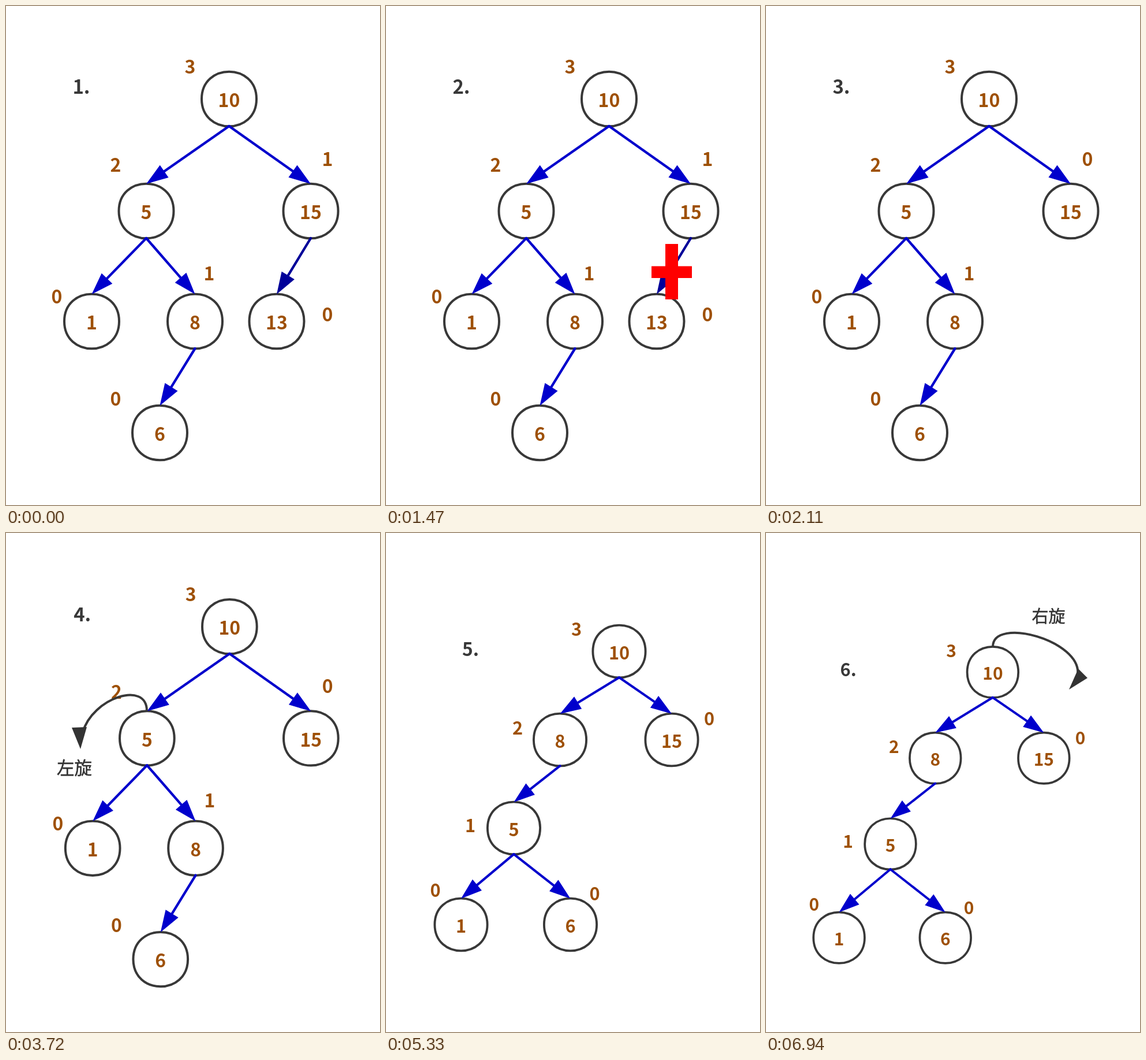
Animation, 648 px wide and 864 px high, one loop 8 s. Source, as an HTML page:

```html
<!DOCTYPE html>
<html lang="zh">
<head>
<meta charset="utf-8">
<title>Tree rotation</title>
<style>
  html, body { margin: 0; width: 100%; height: 100%; overflow: hidden; background: #fff; }
  svg { display: block; width: 648px; height: 864px; }
  text { font-family: "Noto Sans CJK SC", "Noto Sans CJK", "Open Sans", sans-serif; text-anchor: middle; }
  .num { font-weight: 700; fill: #9e5005; }
  .step { font-weight: 700; fill: #383838; }
  .note { fill: #333; stroke: #333; stroke-width: 0.5; }
  .node { fill: #fff; stroke: #383838; }
  .arc { fill: none; stroke: #383838; stroke-width: 4; }
  .head { fill: #333; }
  .cross { fill: #f00; }
  .scene { visibility: hidden; animation: 8s step-end infinite; }
  #s1 { animation-name: show1; }
  #s2 { animation-name: show2; }
  #s3 { animation-name: show3; }
  #s4 { animation-name: show4; }
  #s5 { animation-name: show5; }
  #s6 { animation-name: show6; }
  @keyframes show1 { 0% { visibility: visible } 6.25%, 100% { visibility: hidden } }
  @keyframes show2 { 0% { visibility: hidden } 6.25% { visibility: visible } 26.375%, 100% { visibility: hidden } }
  @keyframes show3 { 0% { visibility: hidden } 26.375% { visibility: visible } 46.5%, 100% { visibility: hidden } }
  @keyframes show4 { 0% { visibility: hidden } 46.5% { visibility: visible } 66.625%, 100% { visibility: hidden } }
  @keyframes show5 { 0% { visibility: hidden } 66.625% { visibility: visible } 86.75%, 100% { visibility: hidden } }
  @keyframes show6 { 0% { visibility: hidden } 86.75%, 100% { visibility: visible } }
</style>
</head>
<body>
<svg id="stage" viewBox="0 0 648 864"></svg>
<script>
const BLUE = '#0000cc', NAVY = '#000099';

// text centred on (x, y)
const label = (text, x, y, size, cls) =>
  `<text class="${cls}" x="${x}" y="${y + size * 0.367}" font-size="${size}">${text}</text>`;

// round node made of two cubic halves
function node({ x, y }, value, k) {
  const w = 47.5 * k, h = 47.3 * k, c = h * 4 / 3;
  return `<path class="node" stroke-width="${4 * k}" d="M${x - w} ${y}` +
    `C${x - w} ${y - c} ${x + w} ${y - c} ${x + w} ${y}` +
    `C${x + w} ${y + c} ${x - w} ${y + c} ${x - w} ${y}Z"/>` +
    label(value, x, y + 2.5, 32 * k, 'num');
}

// arrow from the bottom of a to the top of b
function link(a, b, k, color) {
  const y1 = a.y + 47 * k, y2 = b.y - 47 * k;
  const len = Math.hypot(b.x - a.x, y2 - y1);
  const ux = (b.x - a.x) / len, uy = (y2 - y1) / len;
  const bx = b.x - ux * 38 * k, by = y2 - uy * 38 * k;
  const px = -uy * 13 * k, py = ux * 13 * k;
  return `<path d="M${a.x} ${y1}L${bx} ${by}" stroke="${color}" stroke-width="${4.3 * k}" stroke-linecap="round"/>` +
    `<path d="M${b.x} ${y2}L${bx + px} ${by + py}L${bx - px} ${by - py}Z" fill="${color}"/>`;
}

function tree({ nodes, links, step, k }, number) {
  const all = Object.entries(nodes);
  return all.map(([value, n]) => node(n, value, k)).join('') +
    links.map(([a, b, color = BLUE]) => link(nodes[a], nodes[b], k, color)).join('') +
    all.map(([, n]) => label(n.rank, n.lx, n.ly, 32 * k, 'num')).join('') +
    label(number + '.', ...step, 33 * k, 'step');
}

const at = (x, y, rank, lx, ly) => ({ x, y, rank, lx, ly });

const pruned = {
  k: 1,
  step: [130.5, 140],
  nodes: {
    10: at(386.5, 161, 3, 319, 105),
    5: at(243, 355, 2, 190, 275),
    15: at(528, 355, 0, 557, 265),
    1: at(148.5, 546, 0, 88, 503),
    8: at(327.5, 546, 1, 352, 463),
    6: at(266.5, 739, 0, 190, 680)
  },
  links: [[10, 5], [10, 15], [5, 1], [5, 8], [8, 6]]
};

const full = {
  ...pruned,
  nodes: { ...pruned.nodes, 15: { ...pruned.nodes[15], rank: 1 }, 13: at(469, 546, 0, 557, 534) },
  links: [...pruned.links, [15, 13, NAVY]]
};

const rotated = {
  k: 0.96,
  step: [146.5, 201],
  nodes: {
    10: at(404, 205, 3, 330, 167),
    8: at(301.5, 358, 2, 228, 338),
    15: at(495, 358, 0, 560, 322),
    5: at(221.5, 511, 1, 146, 507),
    1: at(130, 678, 0, 85.5, 619),
    6: at(319.5, 678, 0, 361.5, 625)
  },
  links: [[10, 8], [10, 15], [8, 5], [5, 1], [5, 6]]
};

const placed = (x, y, scale, body) =>
  `<g transform="translate(${x} ${y}) scale(${scale})">${body}</g>`;

const turn = (arc, head) => `<path class="arc" d="${arc}"/><path class="head" d="${head}"/>`;

const scenes = [
  tree(full, 1),
  tree(full, 2) + '<path class="cross" d="M484 412h22v38.5h24v20.5h-24v37h-22v-37h-24v-20.5h24Z"/>',
  tree(pruned, 3),
  placed(2.2, 1.7, 0.9965, tree(pruned, 4)) +
    turn('M244 308C244 255 150 285 133 345', 'M114 337L140 336L129 374Z') +
    label('左旋', 118.5, 406.5, 30.5, 'note'),
  tree(rotated, 5),
  placed(0.2, 41.7, 0.972, tree(rotated, 6)) +
    turn('M393 197C393 144 548 186 540 246', 'M541 235L557 251L525 271Z') +
    label('右旋', 489.5, 144, 29, 'note')
];

document.getElementById('stage').innerHTML =
  scenes.map((body, i) => `<g class="scene" id="s${i + 1}">${body}</g>`).join('');
</script>
</body>
</html>
```
